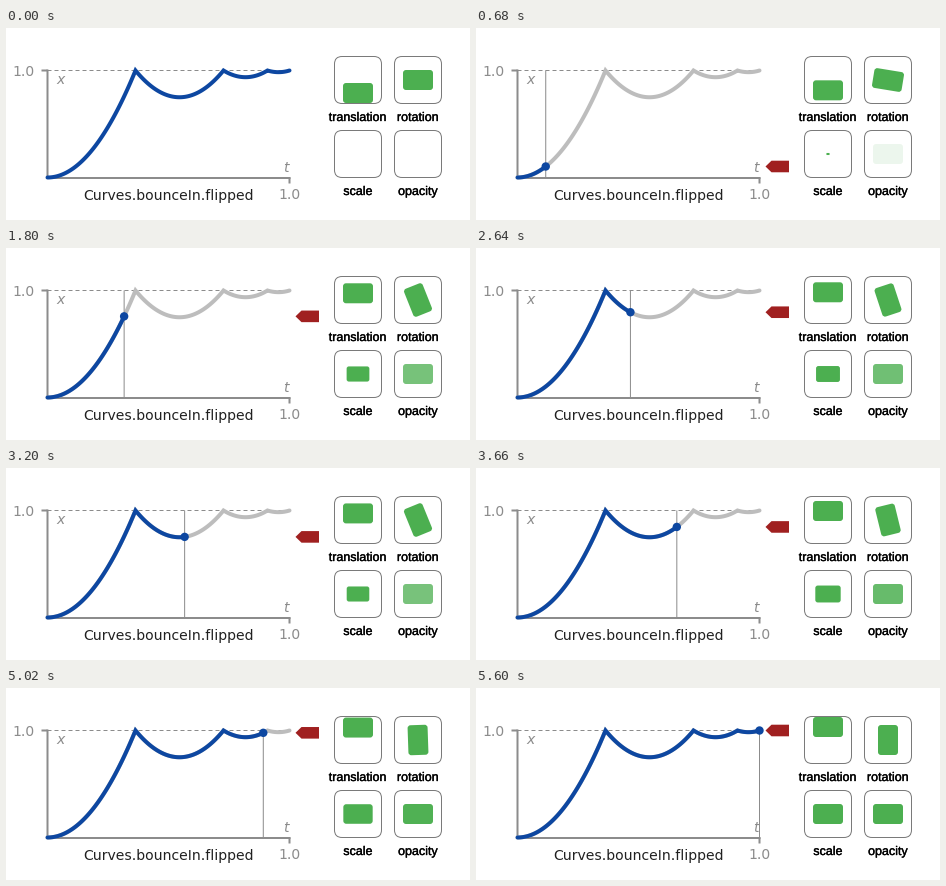
A matplotlib script for the animation above (5620 ms loop, 464 by 192 pixels).

```python
import numpy as np
import matplotlib.pyplot as plt
import matplotlib.patheffects as pe
from matplotlib.animation import FuncAnimation
from matplotlib.patches import Circle, FancyBboxPatch, Polygon
from matplotlib.transforms import Affine2D

W, H, DPI = 464, 192, 64
PX = 72 / DPI  # points per pixel
LEFT, RIGHT, TOP, BASE = 41.5, 283.5, 42.5, 149.5
STEPS, TICK = 120, 20
BLUE, GREEN, RED = "#0d47a1", "#4caf50", "#a02020"
AXIS, PALE, INK = "#8c8c8c", "#bdbdbd", "#212121"

plt.rcParams["font.family"] = "DejaVu Sans"
plt.rcParams["path.simplify"] = False
fig = plt.figure(figsize=(W / DPI, H / DPI), dpi=DPI, facecolor="white")
ax = fig.add_axes([0, 0, 1, 1])
ax.set_xlim(0, W)
ax.set_ylim(H, 0)
ax.axis("off")


def bounce(t):
    t = np.asarray(t, dtype=float)
    k = 7.5625
    return np.select(
        [t < 1 / 2.75, t < 2 / 2.75, t < 2.5 / 2.75],
        [k * t**2, k * (t - 1.5 / 2.75) ** 2 + 0.75,
         k * (t - 2.25 / 2.75) ** 2 + 0.9375],
        k * (t - 2.625 / 2.75) ** 2 + 0.984375)


def to_xy(t):
    return LEFT + (RIGHT - LEFT) * t, BASE + (TOP - BASE) * bounce(t)


def line(xs, ys, color, width, **kw):
    kw.setdefault("solid_capstyle", "butt")
    return ax.plot(xs, ys, color=color, lw=width * PX, snap=False, **kw)[0]


def text(x, y, s, color, size=14, **kw):
    return ax.text(x, y, s, color=color, fontsize=size * PX, va="baseline", **kw)


def curve(color, z):
    return line(*to_xy(T), color, 4, zorder=z, solid_capstyle="round",
                solid_joinstyle="miter")


def tile(cx, cy, label):
    ax.add_patch(FancyBboxPatch(
        (cx - 23.5, cy - 23.5), 47, 47, boxstyle="round,pad=0,rounding_size=7.5",
        fc="none", ec="#7a7a7a", lw=PX, zorder=2))
    name = text(cx, cy + 41, label, "black", 12.5, ha="center",
                family="Liberation Sans")
    name.set_path_effects([pe.withStroke(linewidth=0.35 * PX, foreground="black")])
    block = FancyBboxPatch((-15, -10), 30, 20,
                           boxstyle="round,pad=0,rounding_size=3",
                           fc=GREEN, ec="none", lw=0, zorder=3)
    ax.add_patch(block)
    return block


def place(block, cx, cy, angle=0, scale=1):
    block.set_transform(Affine2D().scale(scale).rotate_deg(angle)
                        .translate(cx, cy) + ax.transData)


T = np.linspace(0, 1, 243)

# Axes and labels
line([LEFT, RIGHT], [TOP, TOP], AXIS, 1, dashes=(4, 3), dash_capstyle="butt")
line([LEFT - 6, LEFT], [TOP, TOP], AXIS, 2)
line([LEFT, LEFT], [TOP - 1, BASE + 1], AXIS, 2)
line([LEFT, RIGHT + 1], [BASE + 0.5, BASE + 0.5], AXIS, 2)
line([RIGHT, RIGHT], [BASE, BASE + 6], AXIS, 2)
text(6.5, 48, "1.0", AXIS)
text(RIGHT, 171, "1.0", AXIS, ha="center")
text(50, 56, "x", AXIS, style="italic")
text(277.5, 144, "t", AXIS, style="italic")
text(162, 172, "Curves.bounceIn.flipped", INK, ha="center")

# Moving parts
rest = curve(PALE, 3)
done = curve(BLUE, 5)
cursor = line([LEFT, LEFT], [TOP, BASE], AXIS, 1, zorder=4)
dot = ax.add_patch(Circle((LEFT, BASE), 4.2, fc=BLUE, ec="none", zorder=6))
flag_shape = np.array([(289.5, 0), (295.5, -5.8), (313, -5.8),
                       (313, 5.8), (295.5, 5.8)])
flag = ax.add_patch(Polygon(flag_shape, closed=True, fc=RED, ec="none"))

mover = tile(352, 52, "translation")
turner = tile(412, 52, "rotation")
grower = tile(352, 126, "scale")
fader = tile(412, 126, "opacity")
place(turner, 412, 52)
place(fader, 412, 126)


def step_at(tick):
    """Three steps per 140 ms, held for 20, 100 and 20 ms."""
    cycle, phase = divmod(tick, 7)
    return 3 * cycle + (phase > 0) + (phase > 5)


def update(tick):
    step = step_at(tick)
    t = step / STEPS
    v = float(bounce(t))
    x, y = to_xy(t)

    running = step > 0
    for part in (rest, cursor, dot, flag):
        part.set_visible(running)
    done.set_data(*to_xy(np.append(T[T < t], t) if running else T))
    cursor.set_xdata([x, x])
    dot.center = x, y
    flag.set_xy(flag_shape + (0, y))

    place(mover, 352, 65 - 26 * v)
    place(turner, 412, 52, angle=90 * v)
    place(grower, 352, 126, scale=max(v, 1e-3))
    grower.set_visible(running)
    fader.set_alpha(v)
    return rest, done, cursor, dot, flag, mover, turner, grower, fader


anim = FuncAnimation(fig, update, frames=281, interval=TICK, repeat=True,
                     repeat_delay=0, blit=False)
plt.show()
```
